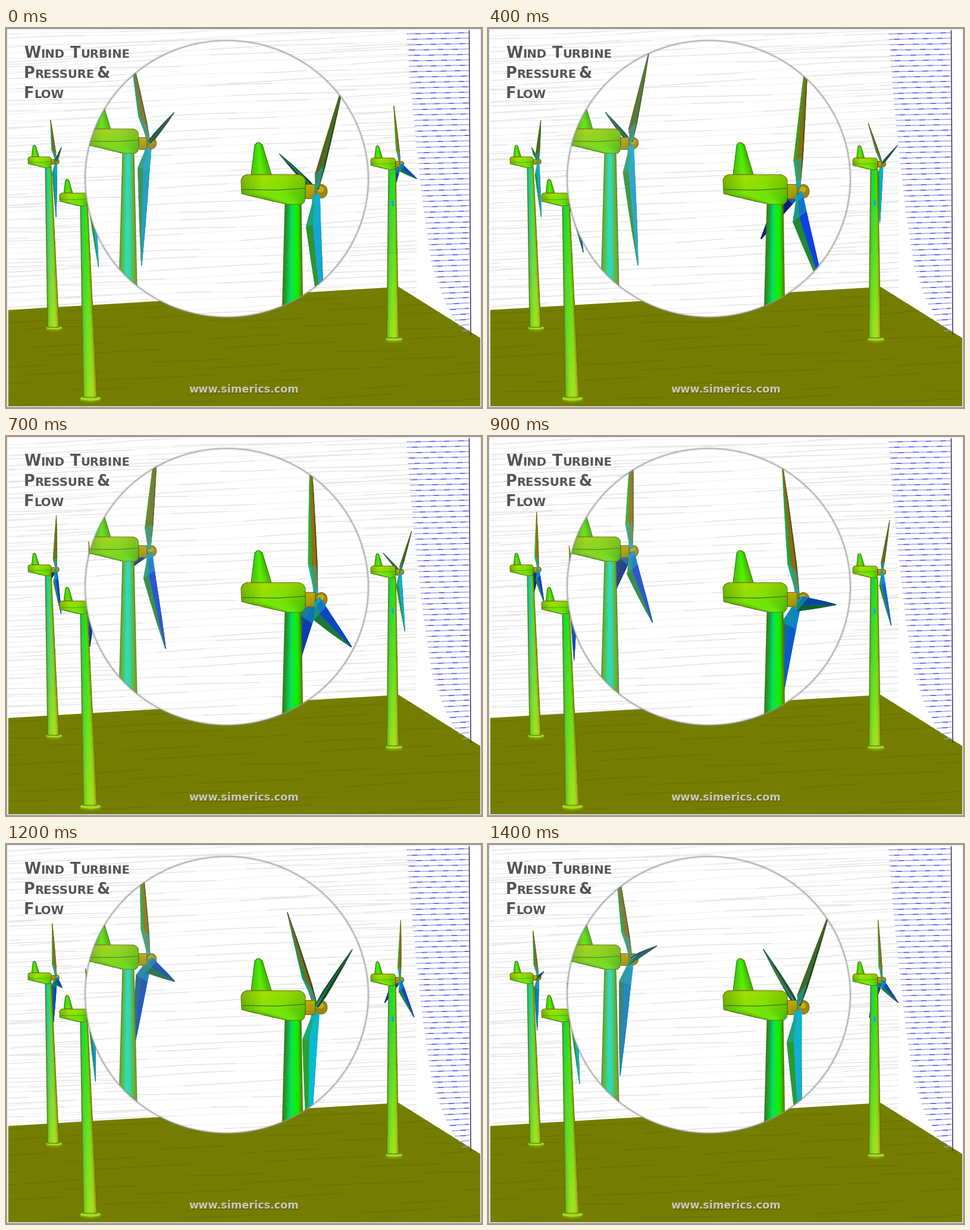
These frames come from a looping animation (800x640 px, 1500 ms). A matplotlib script:

```python
import numpy as np
import matplotlib.pyplot as plt
from matplotlib.animation import FuncAnimation
from matplotlib.collections import LineCollection, PolyCollection
from matplotlib.colors import to_rgb
from matplotlib.patches import Ellipse, Polygon, Rectangle

W, H, FRAMES = 800, 640, 15
PX = 0.72  # points per pixel at 100 dpi
HAZE = (0.62, 0.68, 0.6)
rng = np.random.default_rng(4)

fig = plt.figure(figsize=(W / 100, H / 100), dpi=100, facecolor="white")
ax = fig.add_axes([0, 0, 1, 1])
ax.set_xlim(0, W)
ax.set_ylim(H, 0)
ax.set_autoscale_on(False)
ax.axis("off")


def mix(a, b, t):
    return (1 - t) * np.asarray(a) + t * np.asarray(b)


def ramp(stops, u):
    """Colours at positions u (0..1) along evenly spaced stops."""
    rgb = np.array([to_rgb(c) for c in stops])
    at = np.linspace(0, 1, len(stops))
    return np.stack([np.interp(u, at, rgb[:, i]) for i in range(3)], axis=-1)


# --- ground, inlet profile and lens -------------------------------------
ground = ax.add_patch(Polygon(
    [(3, 475), (660, 436), (797, 522), (797, 637), (3, 637)],
    fc="#757e00", ec="none", zorder=2))

light, dark = [], []
for y in np.arange(9, 514, 9.1):
    x0 = np.interp(y, [9, 100, 200, 300, 400, 450, 490, 514],
                   [673, 680, 690, 701, 716, 733, 753, 770])
    light.append([(x0, y + 1), (779, y - 1)])
    for x in np.arange(x0 + rng.uniform(2, 16), 772, 24):
        slope = 1 - 2 * (x - x0) / (779 - x0)
        dark.append([(x, y + slope), (min(x + 9, 778), y + slope - 0.2)])
ax.add_collection(LineCollection(light, colors="#9a9af4", linewidths=1, zorder=2.5))
ax.add_collection(LineCollection(dark, colors="#5c5cea", linewidths=1.1, zorder=2.6))
ax.plot([778.5, 781], [3, 516], color="#34345c", lw=1.1, zorder=2.7)

LENS = dict(xy=(371, 254), width=476, height=466)
lens = ax.add_patch(Ellipse(**LENS, fc="white", ec="none", zorder=20))
for width, alpha in ((5.5, 0.10), (3.2, 0.18), (1.5, 0.6)):
    ax.add_patch(Ellipse(**LENS, fc="none", ec="#8e8e8e", lw=width * PX,
                         alpha=alpha, zorder=38))


# --- streamlines ----------------------------------------------------------
class Flow:
    """Faint wavy lines with longer streaks drifting to the left."""
    PERIOD = 300

    def __init__(self, ys, span, shades, width, z, clip=None):
        n = len(ys)
        self.span = span
        self.rows = list(zip(ys, rng.uniform(0.6, 2.4, n), rng.uniform(35, 90, n),
                             rng.uniform(0, 6.28, n), rng.uniform(60, 220, n),
                             rng.uniform(0, self.PERIOD, n)))
        self.lines = ax.add_collection(LineCollection(
            [], colors=shades[0], linewidths=width * 0.8, zorder=z))
        self.streaks = ax.add_collection(LineCollection(
            [], colors=shades[1], linewidths=width, zorder=z))
        if clip is not None:
            self.lines.set_clip_path(clip)
            self.streaks.set_clip_path(clip)

    @staticmethod
    def curve(x, row, turn):
        y, amp, wave, phase = row[:4]
        bend = amp * np.sin(x / wave + phase + turn)
        return np.column_stack([x, y - 0.045 * x + bend])

    def update(self, k):
        turn = 2 * np.pi * k / FRAMES
        a, b = self.span
        xs = np.linspace(a, b, 60)
        streaks = []
        for row in self.rows:
            length, start = row[4:]
            first = a - self.PERIOD + (start - self.PERIOD * k / FRAMES) % self.PERIOD
            for x in np.arange(first, b, self.PERIOD):
                lo, hi = max(x, a), min(x + length, b)
                if hi - lo > 4:
                    streaks.append(self.curve(np.linspace(lo, hi, 24), row, turn))
        self.lines.set_segments([self.curve(xs, r, turn) for r in self.rows])
        self.streaks.set_segments(streaks)


def scatter(a, b, n):
    return np.linspace(a, b, n) + rng.uniform(-4, 4, n)


flows = [
    Flow(scatter(14, 500, 74), (3, 690), ("#f1f1f1", "#e7e7e7"), 1.1, 1),
    Flow(scatter(480, 680, 14), (3, 797), ("#727b00", "#6c7403"), 0.9, 2.2, ground),
    Flow(scatter(50, 500, 34), (134, 608), ("#f2f2f2", "#e4e4e4"), 1, 21, lens),
]


# --- turbines -------------------------------------------------------------
BODY = [(0, 9, 98), (3, 3, 104), (9, 0, 108), (32, 1, 108), (45, 55, 107), (50, 78, 102)]
FIN = [(-54, 27, 31), (-50, 23, 36), (0, 17, 51)]


def solid(rows, top, bottom, z, edge="#4c7810", clip=None, fade=0):
    """Shaded shape given as rows of (y, left, right)."""
    y, left, right = np.array(rows, float).T
    v = np.linspace(0, 1, 29)
    u = np.linspace(0, 1, 17)
    yy = y[0] + v * (y[-1] - y[0])
    lo, hi = np.interp(yy, y, left), np.interp(yy, y, right)
    X = lo[:, None] + u * (hi - lo)[:, None]
    Y = np.repeat(yy[:, None], len(u), axis=1)
    um, vm = (u[1:] + u[:-1]) / 2, ((v[1:] + v[:-1]) / 2)[:, None, None]
    rgb = mix(mix(ramp(top, um)[None], ramp(bottom, um)[None], vm), HAZE, fade)
    mesh = ax.pcolormesh(X, Y, rgb, zorder=z)
    pts = list(zip(left, y)) + list(zip(right[::-1], y[::-1]))
    rim = ax.add_patch(Polygon(pts, fc="none", ec=mix(to_rgb(edge), HAZE, fade),
                               lw=0.8, zorder=z + 0.01))
    if clip is not None:
        mesh.set_clip_path(clip)
        rim.set_clip_path(clip)


SPAN = np.array([0.02, 0.08, 0.22, 0.45, 0.7, 1])
TRAIL = np.array([0.3, 0.4, 1, 0.75, 0.45, 0.04])
LEAD = np.array([-0.3, -0.3, -0.25, -0.18, -0.12, -0.02])
THICK = np.array([0.7, 0.8, 1, 0.85, 0.6, 0.1])
ROOT_TINT = (0.75, 0.45, 0, 0, 0)

ANGLES = [0, 50, 80, 108, 145, 172, 195, 215, 245, 270, 292, 320, 360]
TRAIL_RGB = ["#32b428", "#14965a", "#148c5a", "#0a286e", "#146496", "#28a032", "#289632",
             "#1e8c32", "#1e823c", "#0a5f32", "#14783c", "#6e5514", "#32b428"]
LEAD_RGB = ["#a5690a", "#8c6414", "#1e785a", "#0a1e78", "#0a50c8", "#00bed2", "#14aad7",
            "#0f3ceb", "#0f46d2", "#0a4696", "#2d6440", "#3c781e", "#a5690a"]


def hue(stops, angle):
    return ramp(stops, np.interp(angle, ANGLES, np.linspace(0, 1, len(ANGLES))))


class Rotor:
    """Three blades on a tilted disc; those on the left pass behind the tower."""

    def __init__(self, center, wide, lean, tall, start, z, clip, fade):
        self.center = np.array(center)
        self.wide, self.lean, self.tall = wide, lean, tall
        self.start, self.fade = start, fade
        self.layers = [ax.add_collection(PolyCollection([], zorder=z + dz))
                       for dz in (0, 2)]
        for layer in self.layers:
            if clip is not None:
                layer.set_clip_path(clip)

    def blade(self, angle):
        c, s = np.cos(np.radians(angle)), np.sin(np.radians(angle))
        tip = np.array([-self.wide * s + self.lean * c, -self.tall * c])
        chord = np.array([0.07 * self.wide * c - 0.06 * self.tall, -0.07 * self.tall * s])
        normal = 0.018 * self.tall * np.array([-tip[1], tip[0]]) / np.hypot(*tip)

        def edge(offsets, across=chord):
            return self.center + SPAN[:, None] * tip + offsets[:, None] * across

        tr, mid, ld = edge(TRAIL), edge(TRAIL * 0.4), edge(LEAD)
        # The core keeps a blade visible when it is seen edge-on.
        polys = [np.vstack([edge(THICK, normal), edge(-THICK, normal)[::-1]])]
        faces = [0.6 * mix(hue(TRAIL_RGB, angle), hue(LEAD_RGB, angle), 0.5)]
        for a, b, stops in ((tr, mid, TRAIL_RGB), (mid, ld, LEAD_RGB)):
            base = hue(stops, angle)
            for i, tint in enumerate(ROOT_TINT):
                polys.append(np.array([a[i], a[i + 1], b[i + 1], b[i]]))
                faces.append(mix(base, to_rgb("#10b4c8"), tint))
        return polys, [mix(f, HAZE, self.fade) for f in faces]

    def update(self, k):
        groups = [([], []), ([], [])]
        for turn in (0, 120, 240):
            angle = (8 * (k - self.start) + turn) % 360
            polys, faces = self.blade(angle)
            group = groups[int(angle >= 180)]
            group[0].extend(polys)
            group[1].extend(faces)
        for layer, (polys, faces) in zip(self.layers, groups):
            layer.set_verts(polys)
            layer.set_facecolor(faces)
            layer.set_edgecolor(faces)
            layer.set_linewidth(0.4)


def turbine(x, y, size, rotor, tower, top, bottom, z, clip=None, fade=0, foot=None):
    look = dict(clip=clip, fade=fade)

    def tone(color):
        return mix(to_rgb(color), HAZE, fade)

    def place(rows):
        return [(y + size * v, x + size * a, x + size * b) for v, a, b in rows]

    solid(tower, top, bottom, z + 1, **look)
    solid(place(FIN), ["#28c828", "#40f000", "#30b800"],
          ["#48c000", "#68f000", "#48b000"], z + 1.1, **look)
    solid(place(BODY), ["#88b800", "#a8dc00", "#98d800", "#88c800"],
          ["#38a800", "#68e80a", "#60e80a", "#38b800"], z + 1.2, edge="#6c7410", **look)
    seam, = ax.plot([x + size, x + 60 * size, x + 107 * size],
                    [y + 25 * size, y + 26 * size, y + 23 * size],
                    color=tone("#4c8000"), lw=1.1 * size, zorder=z + 1.3)

    hub_y = rotor[0][1]
    end = x + 108 * size
    solid([(hub_y - 12 * size, end, end + 16 * size), (hub_y + 12 * size, end, end + 16 * size)],
          ["#a0c000", "#c8a800", "#b0b810"], ["#88b000", "#a88800", "#889010"],
          z + 1.4, edge="#80600c", **look)
    caps = [ax.add_patch(Ellipse((end + 27 * size, hub_y), 20 * size, 23 * size,
                                 fc=tone("#a08408"), ec=tone("#6c5c10"), lw=0.6,
                                 zorder=z + 1.6)),
            ax.add_patch(Ellipse((end + 26 * size, hub_y - 3 * size), 11 * size, 10 * size,
                                 fc=tone("#bcb018"), ec="none", zorder=z + 1.7))]
    if clip is not None:
        for part in [seam] + caps:
            part.set_clip_path(clip)
    if foot:
        fx, fy, fw = foot
        for dy, color in ((2, "#7c9c08"), (-1, "#a8d820")):
            ax.add_patch(Ellipse((fx, fy + dy), fw, fw * 0.24, fc=color,
                                 ec="#6c8808", lw=0.5, zorder=z + 0.9))
    return Rotor(*rotor, z, clip, fade)


GREEN = ["#4c9c28", "#18d850", "#10e020", "#30e800", "#8c8c10"]
LIME = ["#78a818", "#88dc18", "#a0e420", "#a8dc18", "#a88c18"]
TEAL = ["#3c9c40", "#10c8a0", "#18d0a8", "#48d810", "#a08010"]

rotors = [
    turbine(37, 217, 0.361, ((84, 225), 10, -3, 97, -5.5),
            [(234, 66, 76), (504, 70, 89)], TEAL, LIME, 4, foot=(81, 506, 28)),
    turbine(613, 219, 0.385, ((662, 229), 28.5, -2.5, 102, 13),
            [(238, 643, 655), (522, 640, 660)], GREEN, LIME, 8, foot=(652, 525, 29)),
    turbine(90, 278, 0.43, ((147, 291), 12, -7, 113, 6.5),
            [(298, 125, 137), (622, 130, 153)], GREEN, LIME, 12, foot=(142, 625, 36)),
    turbine(134, 170, 0.82, ((240, 194), 44, 0, 214, -5.5),
            [(210, 196, 215), (436, 190, 220)],
            ["#48a818", "#38c860", "#10e8d0", "#18e0c0", "#48c040", "#509018"],
            ["#58a010", "#40c830", "#10e8d0", "#18e0a8", "#50c020", "#709018"],
            24, clip=lens, fade=0.2),
    turbine(395, 247, 1, ((521, 275), 64, 4, 259, 5.5),
            [(296, 469, 496), (490, 464, 499)],
            ["#387820", "#10a840", "#08dc68", "#10f010", "#18e800", "#487010"],
            ["#387818", "#10b830", "#08e058", "#10f010", "#18e400", "#807008"],
            30, clip=lens),
]
ax.add_patch(Ellipse((650, 295), 4, 11, fc="#10a8e0", ec="none", zorder=9.1))


# --- lettering and border ---------------------------------------------------
def label(x, y, text, size, color):
    return ax.text(x, y, text, fontsize=size * PX, color=color, family="DejaVu Sans",
                   weight="bold", va="baseline", zorder=45)


def small_caps(x, y, word):
    cap = label(x, y, word[0], 25.5, "#555555")
    if word[1:]:
        label(x + cap.get_window_extent().width, y, word[1:].upper(), 19.6, "#555555")


for spot in ((30, 49.5, "Wind"), (108, 49.5, "Turbine"), (30, 84.5, "Pressure"),
             (153, 84.5, "&"), (30, 117.5, "Flow")):
    small_caps(*spot)

for shift, color in ((1, "#5c6208"), (0, "#c8c9bc")):
    label(307 + shift, 614.5 + shift, "www.simerics.com", 17.6, color)

ax.add_patch(Rectangle((2.5, 2.5), 795, 635, fc="none", ec="white", lw=1.6 * PX, zorder=50))
ax.add_patch(Rectangle((0.75, 0.75), 798.5, 638.5, fc="none", ec="#8c8c8c",
                       lw=1.6 * PX, zorder=51))


def update(k):
    for part in flows + rotors:
        part.update(k)
    return []


anim = FuncAnimation(fig, update, frames=FRAMES, interval=100, repeat=True,
                     repeat_delay=0, blit=False)
plt.show()
```
